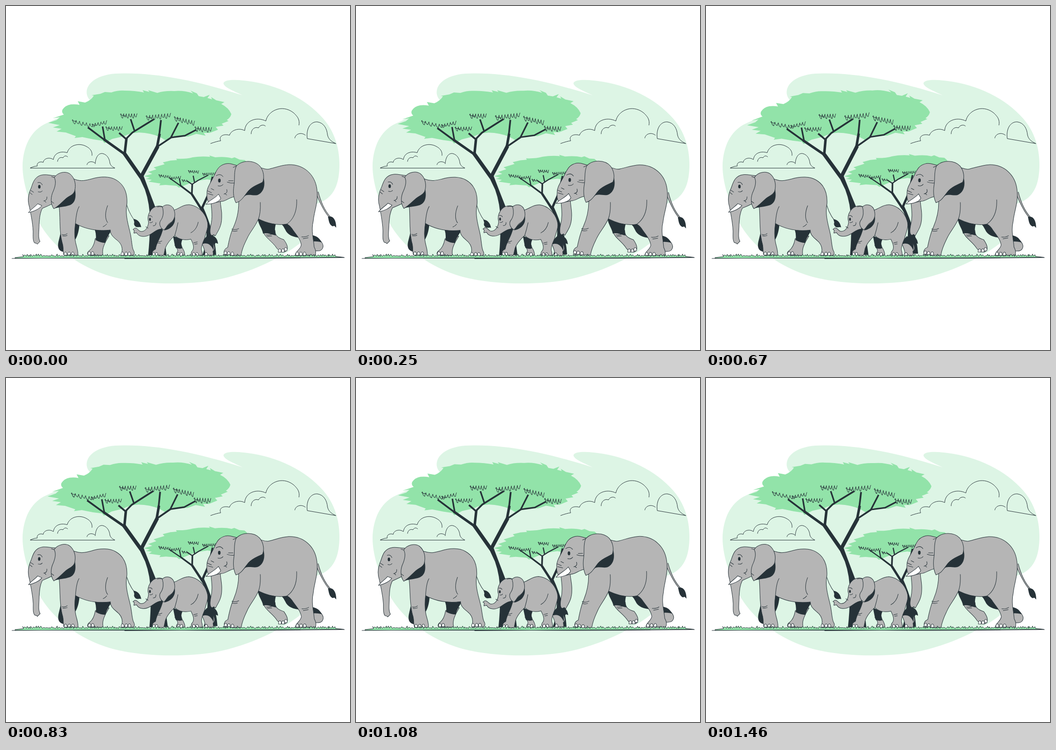
Recreate the animation shown at these times as an HTML page. Size 748 by 748 pixels, loop 1500 ms.

```html
<!DOCTYPE html>
<html lang="en">
<head>
<meta charset="utf-8">
<title>Elephants walking</title>
<style>
html, body { margin: 0; width: 100%; height: 100%; overflow: hidden; background: #fff; }
svg { display: block; width: 100%; height: 100%; }
.sky { fill: #ddf5e5; }
.leaf { fill: #92e3a9; }
.k { fill: #263238; }
.g, .w, .l { stroke: #263238; stroke-width: 1; stroke-linecap: round; stroke-linejoin: round; }
.g { fill: #b5b5b5; }
.w { fill: #fff; }
.l { fill: none; }
.b { fill: none; stroke: #263238; stroke-linejoin: round; }
</style>
</head>
<body>
<svg viewBox="0 0 748 748">
  <path class="sky" d="M90 254C130 236 172 219 182 204C166 187 177 152 238 147C320 143 410 161 514 194C496 185 476 178 473 169C472 160 497 159 525 163C590 171 652 201 690 245C717 276 726 315 725 350C724 391 711 421 672 431C669 470 664 496 643 513C596 551 520 584 455 596C390 607 300 606 236 590C170 573 110 532 78 481C56 444 36 390 36 348C37 308 52 270 90 254Z"/>

  <g class="l">
    <path d="M445 299Q459 294 467 293C462 284 472 277 486 281C489 270 507 264 519 271C520 249 545 240 565 250C569 229 599 212 625 232C635 241 639 248 637 259M533 278C533 268 541 262 549 265C552 259 560 257 564 261M628 287C630 277 643 274 651 281M655 288C652 264 664 251 677 252C692 254 698 268 699 280C701 290 708 295 717 299Z"/>
    <path d="M53 352Q62 348 68 348C66 341 74 337 81 340C82 331 95 328 103 334C105 319 120 315 133 319C138 302 159 297 174 305C184 310 188 317 187 325M112 338C113 331 118 328 124 330C127 325 131 325 134 328M176 345C177 339 186 336 193 341M194 343C195 326 203 319 211 321C221 324 225 333 226 342C228 348 232 350 237 352.500H53"/>
  </g>

  <g id="trees">
    <path class="leaf" d="M300 370L318 365 309 361 327 355 321 351 345 344 341 340 358 336 372 335 370 332Q392 333 406 329Q425 326 444 328L442 325 455 329Q476 327 491 331L497 329 508 334 519 335Q531 344 528 356L512 368 495 370 478 378Q455 381 438 377Q418 379 401 385L376 395 371 391 347 389 333 390 336 386 310 382 317 378 304 376 313 373Z"/>
    <path class="k" d="M421 440L429 438Q440 462 448 491Q456 518 457 542H427Q437 515 436 484Q434 458 421 440Z"/>
    <g class="b">
      <path stroke-width="5" d="M425 442L404 409M425 442L440 410"/>
      <path stroke-width="3.600" d="M405 410L380 391M404 411L405 387M439 412L449 371"/>
      <path stroke-width="2.400" d="M381 392L357 375M380 391L377 375M405 388L393 380M404 388L418 379L439 368M410 384L407 369M444 391L460 378"/>
    </g>
    <path class="leaf" d="M92 254L110 248 117 242 102 244 126 236Q120 231 123 225Q129 216 141 214Q151 213 160 215L156 207 172 210Q185 205 191 195L186 194 205 191 215 187 229 188Q244 183 258 184Q280 184 300 188L297 183 312 187 309 183 329 189Q345 184 366 185Q385 183 407 190L401 184 415 190 419 196 430 198 443 193 438 200 448 203 446 198 457 205 475 209 468 213Q484 221 490 235Q488 243 480 248L484 250 469 256 473 260 456 263 461 269 443 276 430 276 434 282 414 278 396 284 363 283 347 292 335 285Q315 276 289 275Q269 276 257 283L231 289 214 298 210 293 190 290 166 285 149 287 152 283 130 275 110 273 121 267 102 264 117 259Z"/>
    <path class="k" d="M289 371L299 369Q310 399 323 433Q343 480 349 542H309Q313 505 313 468Q313 430 302 399Z"/>
    <g class="b">
      <path stroke-width="8" d="M294 373L257 320M294 371L330 305"/>
      <path stroke-width="5.500" d="M258 322L213 290M258 322L262 287M328 309L334 278"/>
      <path stroke-width="3.800" d="M214 291L178 264M262 290L246 276M261 289L275 275L322 246M333 282L337 248M329 306L359 286"/>
      <path stroke-width="3.400" d="M215 291L210 262M280 273L271 246M358 287L375 254M358 286L389 282L414 269"/>
    </g>
    <g id="twigs" class="l"></g>
  </g>

  <g id="cow">
    <path class="k" d="M158 434L160 470C159 498 150 510 147 513L130 535C116 535 111 527 114 513L120 488Z"/>
    <path class="g" d="M194 506C192 518 188 526 182 531C176 535 176 540 179 542H211C208 530 213 520 217 512L224 500Z"/>
    <path class="k" d="M193 486L232 484C222 499 217 508 216 515Q206 515 195 509Q197 498 193 486Z"/>
    <path class="l" d="M260 421C263 440 272 457 281 468"/>
    <path class="k" d="M277 463C286 464 292 470 294 481C290 479 286 483 281 479Q277 475 279 470Z"/>
    <path class="g" d="M105 372C125 374 142 373 150 377C164 382 174 379 186 376C205 370 226 370 239 378C258 389 264 408 263 429C258 455 267 478 271 498C274 515 274 525 277 531Q281 537 277 542H250C257 524 248 514 240 508C231 501 226 494 227 487C201 490 174 486 151 473C149 487 148 504 153 521C155 529 157 535 156 542H126C123 534 126 526 122 514C116 491 118 466 116 440L105 405Z"/>
    <path class="l" d="M159 436Q153 445 151 473M221 434C215 449 215 463 221 471M219 474Q216 478 211 480M122 497Q128 499 133 495M123 500Q129 501 133 499"/>
    <path class="g" d="M107 369C98 369 90 366 81 367C63 369 59 383 55 395C47 412 47 425 51 437C54 453 58 470 59 490C59 501 58 510 62 515L66 516 68 518 71 515 74 512C69 504 72 490 72 475C73 459 74 450 79 440Q91 435 105 428L122 400Z"/>
    <path class="w" d="M49 449C61 447 73 441 78 434L69 430C63 437 55 441 49 449Z"/>
    <path class="k" d="M150 398C153 415 151 428 139 433C128 437 113 437 103 441C115 428 122 418 136 414Z"/>
    <path class="g" d="M99 371L105 373C112 362 129 358 139 365C150 374 153 389 149 403C145 412 138 412 130 419C121 427 114 435 104 441C96 430 97 414 103 402C108 390 109 380 105 373"/>
    <ellipse class="k" cx="72.500" cy="393" rx="2.700" ry="4"/>
    <path class="l" d="M69 384Q76 382 79 389M70 404Q76 406 79 402M82 424Q90 423 89 415M84 424L87 427M54 401L60 405M52 406L57 410M99 425L104 429"/>
    <g class="nails" data-at="181,537 188,537 253,538 261,538 268,538 129,538 137,538 145,538"></g>
  </g>

  <g id="calf">
    <path class="g" d="M425 511L438 503 448 513C455 522 455 530 450 533L451 542H432C435 531 426 521 425 511Z"/>
    <path class="k" d="M426 512L437 500 443 505C449 511 453 519 451 531C445 516 435 514 426 518Z"/>
    <path class="g" d="M367 520C370 526 375 530 373 534Q368 540 372 542H389Q389 534 383 525L378 510Z"/>
    <path class="k" d="M363 500L384 507C380 515 381 520 383 527Q376 529 369 526C366 518 365 508 363 500Z"/>
    <path class="l" d="M437 468C443 482 447 495 452 502M439 471Q446 488 453 500"/>
    <path class="k" d="M448 500C455 500 460 507 461 517L456 515 454 518 451 514C447 510 448 505 448 500Z"/>
    <path class="g" d="M355 445C373 446 380 432 398 432C417 434 432 449 437 466C442 480 435 490 432 505C426 518 423 528 426 534L427 542H405C402 539 402 535 406 531C410 524 406 515 402 507C389 510 376 508 367 499C355 510 346 522 345 533L343 542H320C316 538 318 532 325 529C327 515 335 506 339 492Z"/>
    <path class="l" d="M367 499Q371 486 374 471M418 470C415 484 408 490 402 493M330 512Q335 514 339 511M329 515L336 516M408 515L416 513M410 518L416 517"/>
    <path class="g" d="M340 436C329 432 318 438 313 447C308 455 308 463 310 470C309 482 302 492 292 490C286 487 285 482 280 483L276 486 279 488 278 494 284 493C289 503 303 503 313 497C322 492 327 486 337 485L354 466Z"/>
    <path class="k" d="M367 457C370 473 360 485 344 488C348 478 356 474 362 468Z"/>
    <path class="g" d="M329 437Q335 435 340 437C347 430 358 431 364 440C370 453 367 465 358 471C350 475 350 482 343 487C335 482 332 473 336 467C343 458 343 446 340 437"/>
    <ellipse class="k" cx="313" cy="464" rx="2" ry="3.200"/>
    <path class="l" d="M311 456Q316 455 318 459M313 471Q317 472 319 469M320 478Q327 478 326 471M304 480L309 483"/>
    <g class="nails" data-at="321,539 327,539 375,539 381,539 408,539 415,539 435,539"></g>
  </g>

  <g id="bull">
    <path class="g" d="M664 500C670 502 680 504 685 512C690 518 691 524 687 529C682 535 675 531 669 533Z"/>
    <path class="k" d="M664 498Q676 500 681 506L687 514Q675 511 668 512Z"/>
    <path class="k" d="M598 473L632 470 645 498 641 504C625 503 612 498 607 486Q604 479 598 473Z"/>
    <path class="g" d="M558 488C562 504 580 512 589 527C595 534 604 537 609 533C616 526 609 515 604 508C592 504 585 500 585 488Z"/>
    <path class="k" d="M547 460L588 470C584 482 584 490 587 499C577 497 567 492 559 495C557 483 548 475 547 460Z"/>
    <path class="g" d="M673 405C680 421 690 446 704 461L706 459C692 444 684 424 679 404"/>
    <path class="k" d="M700 458C710 455 718 463 718 482L714 478 710 479C702 475 702 466 700 458Z"/>
    <path class="g" d="M540 349C561 352 565 357 574 354C590 350 600 346 615 345C648 344 672 367 676 398C680 425 670 446 668 468C663 488 669 508 670 524Q676 535 672 542H629C629 533 641 529 642 519C640 505 628 494 622 484Q617 477 611 474C590 478 567 472 549 463C541 481 530 492 524 506C517 520 513 530 511 542H478C471 537 474 528 482 525C485 510 488 495 495 480C501 466 506 450 506 426L520 380Z"/>
    <path class="l" d="M549 463Q554 450 553 427M632 421C633 441 628 462 611 474M491 485Q499 488 506 484M492 489Q498 491 503 489M643 502Q652 503 658 499M646 506L657 504M566 498Q574 499 580 495M568 501L578 500"/>
    <path class="g" d="M446 430C447 443 450 460 445 478C443 489 443 498 448 499L452 497 455 500C462 488 469 478 469 460C470 446 466 435 466 422Z"/>
    <path class="g" d="M505 347C494 346 490 341 478 343C461 347 458 358 452 370C445 385 436 395 437 408C436 418 439 426 443 430L467 425C478 425 483 417 499 414L525 380Z"/>
    <path class="w" d="M435 431C450 431 464 426 467 418L462 409C455 418 444 421 435 431Z"/>
    <path class="k" d="M560 373C565 392 559 406 547 411C538 413 530 409 521 412L503 427C513 412 528 392 544 387Z"/>
    <path class="g" d="M494 351L501 348C514 334 540 335 552 348C561 359 562 374 558 383C547 389 536 392 527 402C517 414 513 424 500 428C493 414 494 400 496 388C498 374 495 359 501 348"/>
    <ellipse class="k" cx="464" cy="379.500" rx="2.800" ry="4.200"/>
    <path class="l" d="M457 369Q466 363 472 371M461 391Q468 393 472 388M481 383Q489 386 496 385M484 380L494 380M474 409Q483 407 480 399M476 408L480 411M438 402L447 406M439 408L450 411M446 397L452 400"/>
    <g class="nails" data-at="477,536 484,537 492,538 595,531 602,531 608,528 633,538 641,538 649,538"></g>
  </g>

  <path id="grass" class="l" style="fill:#92e3a9"/>
  <path class="l" d="M13 549Q250 547 380 548.500T736 547M258 549.500Q420 548 640 547.500"/>
</svg>
<script>
const $ = id => document.getElementById(id);
const LOOP = 1500, FRAME = LOOP / 36;

// A row of small hooked leaves hanging along a line
function twig(x, y, x2, y2, n, h) {
  const dx = (x2 - x) / n, dy = (y2 - y) / n;
  let d = `M${x + h} ${y + h * .5}q${-h * 1.6} ${-h * .2} ${-h} ${-h * .5}`;
  for (let i = 0; i < n; i++) {
    const drop = h * (i % 2 ? .75 : 1);
    d += `q${dx * .1} ${drop} ${dx * .65} ${drop + dy}q${dx * .1} ${-drop * .5} ${dx * .35} ${-drop}`;
  }
  return `<path d="${d}"/>`;
}
$('twigs').innerHTML = [
  [145, 247, 190, 257, 6, 8], [188, 256, 219, 249, 5, 8], [218, 262, 253, 262, 6, 9],
  [250, 234, 285, 234, 6, 10], [306, 238, 358, 233, 8, 11], [367, 240, 410, 250, 7, 10],
  [412, 262, 447, 264, 6, 11], [333, 366, 357, 369, 5, 6], [356, 372, 380, 370, 5, 6],
  [397, 357, 419, 358, 5, 6], [428, 363, 455, 362, 6, 6], [383, 377, 393, 378, 2, 5]
].map(a => twig(...a)).join('');

for (const g of document.querySelectorAll('.nails'))
  g.innerHTML = g.dataset.at.split(' ').map(s => {
    const [x, y] = s.split(',');
    return `<path class="w" d="M${x - 3} ${+y + 4}q0 -8 4 -7q3 2 2 7z"/>`;
  }).join('');

let seed = 11;
const rnd = () => (seed = seed * 16807 % 2147483647) / 2147483647;
let blades = 'M20 547L38 545';
for (let x = 35; x < 714;) {
  const w = 3 + rnd() * 4, lean = (rnd() - .5) * 4;
  blades += `L${x + w / 2 + lean} ${539 + rnd() * 4}L${x += w} ${543.5 + rnd() * 1.5}`;
}
$('grass').setAttribute('d', blades + 'L735 546.500L380 548.500L20 548.500Z');

// Triangle wave: 0, 1, 0, -1 at the quarters of the loop
const wave = t => {
  const p = ((t / LOOP) % 1 + 1) % 1;
  return p < .25 ? 4 * p : p < .75 ? 2 - 4 * p : 4 * p - 4;
};
const TREE_LAG = 965;
const parts = [
  ['trees', 308, 364, TREE_LAG], ['cow', 171, 452, 0],
  ['calf', 368, 487, 0], ['bull', 577, 440, 0]
].map(([id, x, y, lag]) => ({ el: $(id), x, y, lag }));

function draw(ms) {
  const t = Math.floor((ms % LOOP + 4) / FRAME) * FRAME;
  for (const { el, x, y, lag } of parts)
    el.setAttribute('transform', `rotate(${wave(t - lag) - wave(-lag)} ${x} ${y})`);
}

let start;
function tick(now) {
  start ??= now;
  draw(now - start);
  requestAnimationFrame(tick);
}
draw(0);
requestAnimationFrame(tick);
</script>
</body>
</html>
```
